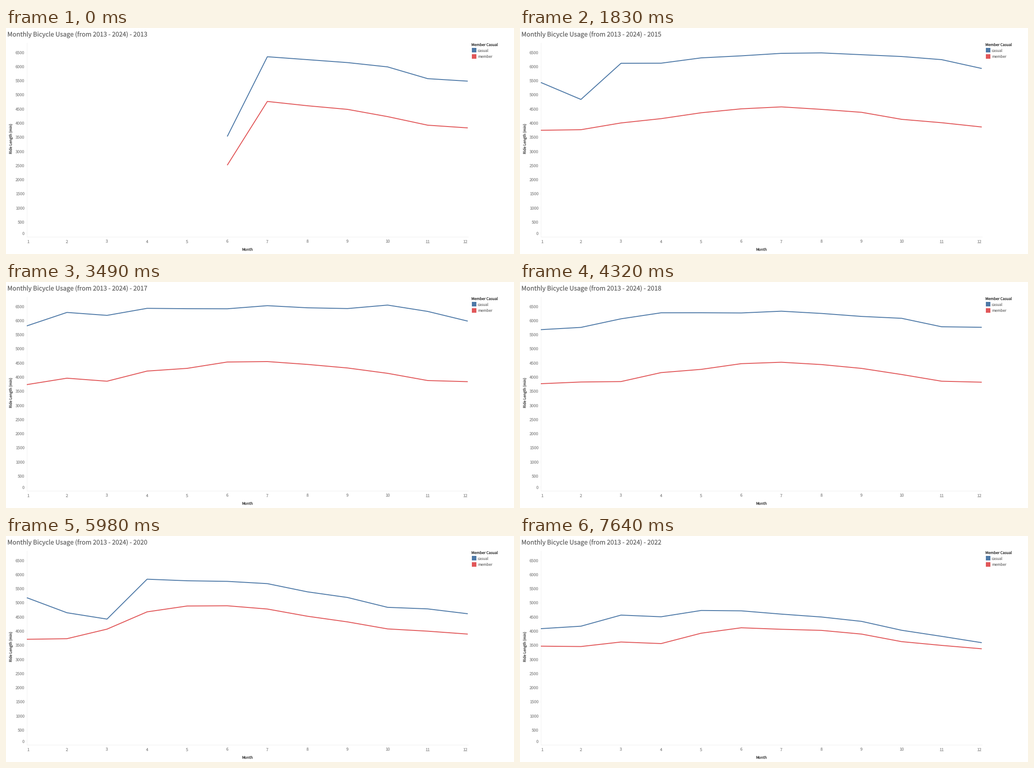
A matplotlib script that plays this animation: 1121 px wide and 500 px high, repeating every 8000 ms.

```python
import matplotlib.pyplot as plt
from matplotlib.animation import FuncAnimation
from matplotlib.patches import Rectangle

W, H, DPI = 1121, 500, 64
LOOP, STEP = 8000, 20           # ms
FIRST_HOLD, HOLD = 1000, 830    # ms per year
FIRST_YEAR, LAST_YEAR = 2013, 2022
PT = 72 / DPI                   # points per pixel

BLUE, RED = "#4e79a7", "#e15759"
LEFT, MONTH_W = 46, 88.45
ZERO_Y, PX_PER_MIN = 461.9, 0.06257

plt.rcParams["font.family"] = "Noto Sans CJK JP"
plt.rcParams["text.hinting"] = "none"

# Ride minutes per month; a short year ends in December.
CASUAL = {
    2013: [3546, 6366, 6263, 6159, 6007, 5591, 5503],
    2014: [5384, 5456, 5991, 6151, 6311, 6302, 6398, 6326, 6247, 6103, 5791, 5722],
    2015: [5456, 4856, 6135, 6138, 6326, 6398, 6486, 6502, 6438, 6374, 6263, 5951],
    2017: [5831, 6306, 6202, 6451, 6438, 6435, 6545, 6470, 6443, 6566, 6342, 5999],
    2019: [5563, 5248, 5959, 6135, 6151, 6140, 6155, 6071, 5887, 5631, 5256, 5563],
    2020: [5200, 4669, 4444, 5855, 5799, 5778, 5698, 5408, 5208, 4860, 4805, 4633],
    2022: [4105, 4193, 4585, 4526, 4749, 4736, 4620, 4518, 4364, 4049, 3834, 3610],
}
MEMBER = {
    2013: [2531, 4785, 4633, 4505, 4249, 3946, 3850],
    2014: [3838, 3858, 4001, 4201, 4441, 4561, 4588, 4481, 4377, 4145, 3838, 3765],
    2015: [3766, 3786, 4025, 4177, 4385, 4524, 4593, 4505, 4401, 4153, 4033, 3882],
    2017: [3754, 3981, 3874, 4233, 4329, 4553, 4569, 4468, 4342, 4153, 3898, 3858],
    2019: [3818, 3711, 3850, 4124, 4257, 4436, 4521, 4457, 4313, 4069, 3850, 3821],
    2020: [3730, 3751, 4089, 4700, 4907, 4915, 4800, 4545, 4345, 4097, 4017, 3914],
    2021: [3609, 3522, 3862, 4139, 4426, 4526, 4442, 4295, 4130, 3872, 3766, 3654],
    2022: [3487, 3474, 3634, 3578, 3945, 4137, 4084, 4045, 3914, 3647, 3514, 3394],
}


def month_x(month):
    return LEFT + MONTH_W * (month - 1)


def minutes_y(minutes):
    return ZERO_Y - PX_PER_MIN * minutes


def year_values(data, year):
    """Values of a year, or the mean of its neighbours."""
    if year in data:
        return data[year]
    return [(a + b) / 2 for a, b in zip(data[year - 1], data[year + 1])]


def year_points(data, year):
    values = year_values(data, year)
    start = 13 - len(values)
    xs = [month_x(start + i) for i in range(len(values))]
    return xs, [minutes_y(v) for v in values]


def label(x, y, text, size, color, ha="left", **kw):
    kw.setdefault("va", "baseline")
    return ax.text(x, y, text, fontsize=size * PT, color=color, ha=ha, **kw)


def series_line(color):
    return ax.plot([], [], color=color, lw=2 * PT, solid_capstyle="butt",
                   solid_joinstyle="round")[0]


fig = plt.figure(figsize=(W / DPI, H / DPI), dpi=DPI, facecolor="white")
ax = fig.add_axes([0, 0, 1, 1])
ax.set_xlim(0, W)
ax.set_ylim(H, 0)
ax.axis("off")

# Axes
ax.plot([45.5, 45.5, 1020], [33, 461.5, 461.5], color="#f0f0f0", lw=PT)
for minutes in range(0, 6501, 500):
    y = minutes_y(minutes) if minutes else 455.5
    label(41, y + 3.3, str(minutes), 9, "#8c8c8c", "right")
for month in range(1, 13):
    x = {1: 48.5, 12: 1013}.get(month, month_x(month))
    label(x, 476, str(month), 9, "#8c8c8c", "center")
label(532.5, 493, "Month", 8.2, "#333333", "center")
label(12, 244.5, "Ride Length (min)", 8.1, "#333333", "center",
      va="center", rotation=90)

# Legend
label(1027, 40.3, "Member Casual", 8.1, "#222222")
for name, color, top in (("casual", BLUE, 44), ("member", RED, 57.5)):
    ax.add_patch(Rectangle((1028, top), 10, 10, fc=color, lw=0))
    label(1041, top + 8.4, name, 8.1, "#767676")

title = label(3, 19.5, "", 14, "#606060")
casual_line = series_line(BLUE)
member_line = series_line(RED)


def update(frame):
    time = frame * STEP + STEP / 2
    passed = int((time - FIRST_HOLD) // HOLD) + 1
    year = min(FIRST_YEAR + max(passed, 0), LAST_YEAR)
    title.set_text(f"Monthly Bicycle Usage (from 2013 - 2024) - {year}")
    casual_line.set_data(*year_points(CASUAL, year))
    member_line.set_data(*year_points(MEMBER, year))
    return title, casual_line, member_line


anim = FuncAnimation(fig, update, frames=LOOP // STEP, interval=STEP,
                     repeat=True, repeat_delay=0, blit=False)
plt.show()
```
